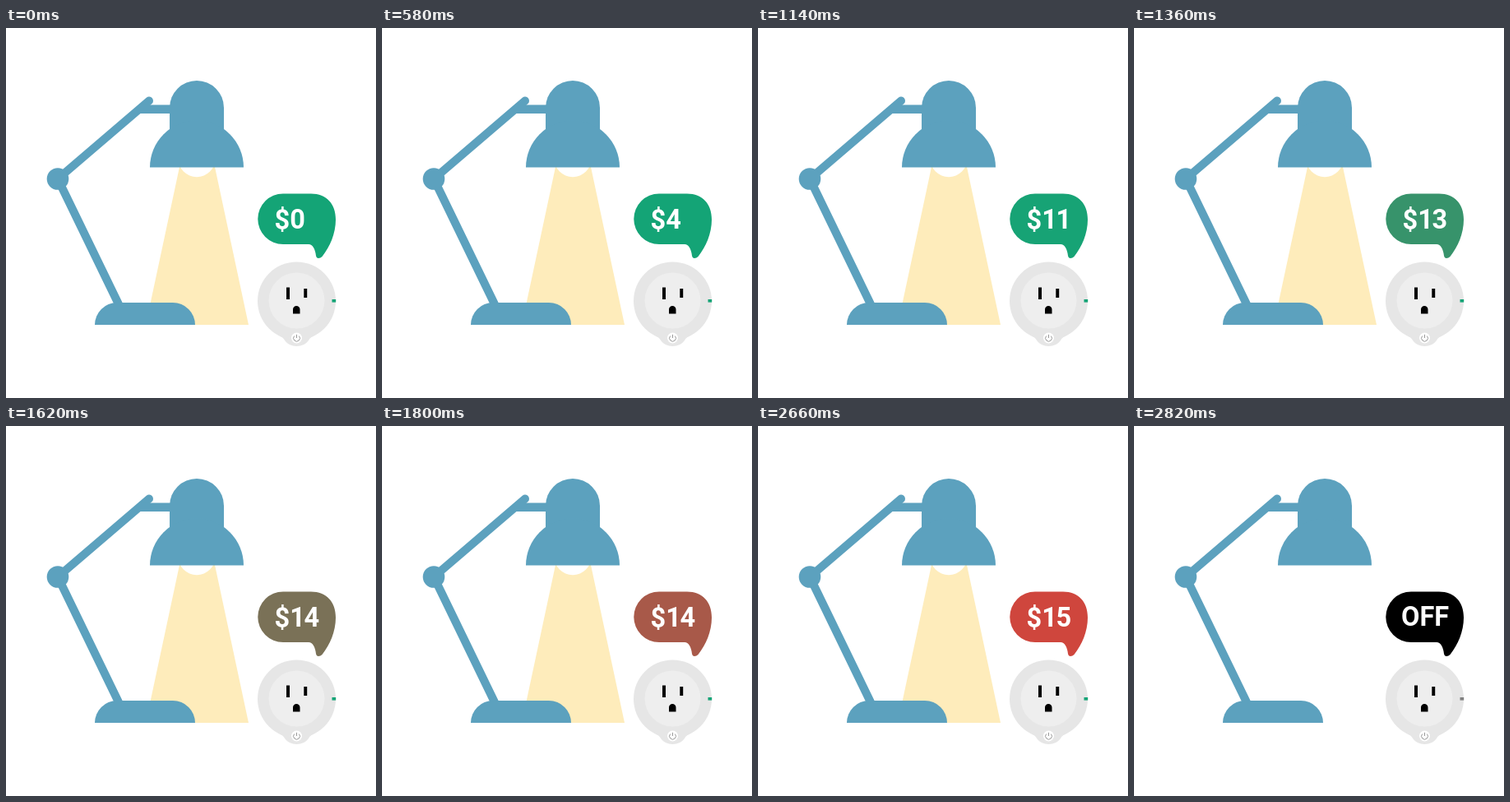
Write an HTML page that moves like this. It is 450 px wide and 450 px high and loops after 3.6 s.

```html
<!DOCTYPE html>
<html lang="en">
<head>
<meta charset="utf-8">
<title>Lamp energy cost</title>
<style>
  html, body { margin: 0; width: 100%; height: 100%; overflow: hidden; background: #fff; }
  svg { display: block; width: 100%; height: 100%; }
  text { font: 700 32.5px Roboto, sans-serif; fill: #fff; }
</style>
</head>
<body>
<svg viewBox="0 0 450 450">
  <g id="light">
    <path fill="#feecbb" d="M211 169H254L295 361H170Z"/>
    <circle cx="232" cy="158.5" r="22.7" fill="#fff"/>
  </g>

  <g id="lamp" fill="#5ca1be">
    <path d="M63 183.5L174 88.5M63 183.5L137 336" stroke="#5ca1be" stroke-width="10" stroke-linecap="round"/>
    <path d="M163 93.5H200V104H163Z"/>
    <circle cx="63" cy="183.5" r="13.3"/>
    <path d="M199 130V97A33 33 0 0 1 265 97V130Z"/>
    <path d="M175 169.5A57 57 0 0 1 289 169.5Z"/>
    <path d="M108 361A27 27 0 0 1 135 334H203A27 27 0 0 1 230 361Z"/>
  </g>

  <g id="plug">
    <g fill="#e6e6e6">
      <circle cx="353.5" cy="332" r="47.5"/>
      <path d="M331 373Q337 376 339 380Q344 387 353.5 387Q363 387 368 380Q370 376 376 373Z"/>
    </g>
    <circle cx="353.5" cy="331.5" r="34" fill="#eee"/>
    <path d="M341 315.5H345V330H341ZM362.3 317H366.2V328H362.3ZM349 347.5V342.3A4.25 4.25 0 0 1 357.5 342.3V347.5Z"/>
    <circle cx="353.5" cy="377" r="6.5" fill="#fff"/>
    <path d="M350.6 374.6A3.9 3.9 0 1 0 356.4 374.6M353.5 372.8V377" fill="none" stroke="#999"/>
    <rect id="led" x="396.5" y="330" width="4.7" height="3.6"/>
  </g>

  <path id="bubble" d="M337 201.5H371C390 201.5 401 214 401 233C401 250 394 266 384.5 278Q382.5 280 380 280Q377.6 280 377 277C376 269 373 263 368 263H337A30.75 30.75 0 0 1 337 201.5Z"/>
  <text id="cost" y="243.5" x="326.5 345.3 362.5"></text>
  <text id="off" y="242.5" x="354" text-anchor="middle">OFF</text>
</svg>
<script>
  const LOOP = 3600, OFF_AT = 2820;
  const GREEN = [20, 164, 118], RED = [207, 70, 61];
  const [light, led, bubble, cost, off] =
    ['light', 'led', 'bubble', 'cost', 'off'].map(id => document.getElementById(id));

  const progress = (t, start, end) => Math.min(1, Math.max(0, (t - start) / (end - start)));
  const easeOut = p => 1 - (1 - p) ** 2;
  const easeInOut = p => (1 - Math.cos(Math.PI * p)) / 2;
  const mix = (a, b, p) => `rgb(${a.map((v, i) => Math.round(v + (b[i] - v) * p))})`;
  const show = (el, on) => el.setAttribute('visibility', on ? 'visible' : 'hidden');

  function draw(t) {
    const on = t < OFF_AT;
    show(light, on);
    show(cost, on);
    show(off, !on);
    cost.textContent = '$' + Math.floor(15 * easeOut(progress(t, 350, 1810)));
    bubble.setAttribute('fill', on ? mix(GREEN, RED, easeInOut(progress(t, 1060, 2120))) : '#000');
    led.setAttribute('fill', on ? mix(GREEN, RED, 0) : '#808080');
  }

  const start = performance.now();
  function tick() {
    draw((performance.now() - start) % LOOP);
    requestAnimationFrame(tick);
  }
  tick();
</script>
</body>
</html>
```
